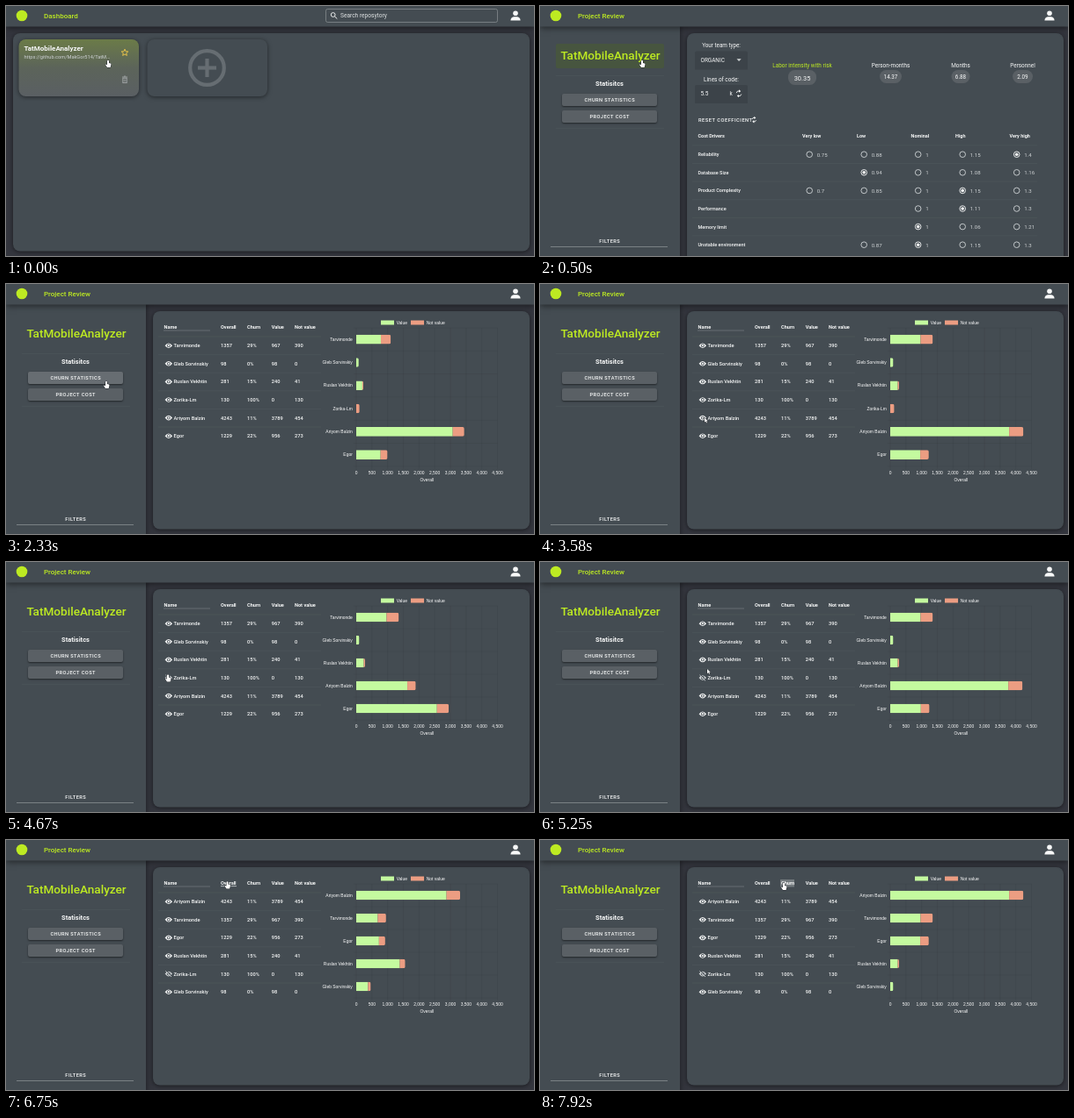
Animation of 600x285 px, one loop 8 s. Source, as an HTML page with a canvas:

```html
<!DOCTYPE html>
<html lang="en">
<head>
<meta charset="utf-8">
<title>Project review</title>
<style>
html, body { margin: 0; width: 100%; height: 100%; overflow: hidden; background: #34363e; }
canvas { display: block; }
</style>
</head>
<body>
<canvas id="stage" width="600" height="285"></canvas>
<script>
const ctx = document.getElementById('stage').getContext('2d');
const LOOP = 8000;
const GAP = '#34363e', PANEL = '#444c52', FIELD = '#3c4349', CHIP = '#5a6065', LINE = '#4e565b';
const WHITE = '#f7f8f8', SOFT = '#cfd3d5', LIME = '#bdea22', GREEN = '#c4fa9f', ORANGE = '#ec9d82';
const ROBOTO = 'Roboto, sans-serif', ARIAL = '"Liberation Sans", sans-serif';

const person = (name, overall, churn, value, rest) => ({ name, overall, churn, value, rest });
const people = [
  person('Tarvimonde', 1357, 29, 967, 390),
  person('Gleb Sorvinskiy', 98, 0, 98, 0),
  person('Ruslan Vekhtin', 281, 15, 240, 41),
  person('Zorika-Lm', 130, 100, 0, 130),
  person('Artyom Balzin', 4243, 11, 3789, 454),
  person('Egor', 1229, 22, 956, 273)
];
const hiddenPerson = people[3];
const sorted = [...people].sort((a, b) => b.overall - a.overall);
const isShown = p => p !== hiddenPerson;
const chartStates = [
  { start: 1990, rows: people },
  { start: 4540, rows: people.filter(isShown) },
  { start: 6505, rows: sorted.filter(isShown) }
];

const drivers = [
  ['Reliability', [0.75, 0.88, 1, 1.15, 1.4], 4],
  ['Database Size', [0, 0.94, 1, 1.08, 1.16], 1],
  ['Product Complexity', [0.7, 0.85, 1, 1.15, 1.3], 3],
  ['Performance', [0, 0, 1, 1.11, 1.3], 3],
  ['Memory limit', [0, 0, 1, 1.06, 1.21], 2],
  ['Unstable environment', [0, 0.87, 1, 1.15, 1.3], 2]
];
const levels = [['Very low', 298], ['Low', 360], ['Nominal', 421.5], ['High', 472], ['Very high', 533.5]];

// Pointer stops: time, x, y
const pointerPath = [
  [0, 116, 62], [920, 116, 62], [1250, 114, 111], [2670, 114, 111],
  [3420, 187, 152.5], [3580, 187, 152.5], [4170, 184, 128.5], [5000, 184, 128.5],
  [5240, 190, 122], [5420, 190.5, 121.5], [6080, 251.5, 47.5], [7200, 251.5, 47.5],
  [7560, 277, 49], [LOOP, 277, 49]
];

const lerp = (a, b, k) => a + (b - a) * k;
const easeOutQuart = k => 1 - (1 - k) ** 4;
const smooth = k => k * k * (3 - 2 * k);

function text(str, x, y, size = 5.6, { color = WHITE, align = 'left', weight = 500, font = ROBOTO, spacing = 0 } = {}) {
  ctx.font = `${weight} ${size}px ${font}`;
  ctx.letterSpacing = spacing + 'px';
  ctx.textAlign = align;
  ctx.fillStyle = color;
  ctx.fillText(str, x, y);
}

function box(x, y, w, h, radius, fill, shadow = 0) {
  ctx.save();
  if (shadow) {
    ctx.shadowColor = 'rgba(0,0,0,.5)';
    ctx.shadowBlur = shadow;
    ctx.shadowOffsetY = 1;
  }
  ctx.fillStyle = fill;
  ctx.beginPath();
  ctx.roundRect(x, y, w, h, radius);
  ctx.fill();
  ctx.restore();
}

function line(points, color, width = 1) {
  ctx.strokeStyle = color;
  ctx.lineWidth = width;
  ctx.beginPath();
  points.forEach(([x, y]) => ctx.lineTo(x, y));
  ctx.stroke();
}

function ring(x, y, r, color, width = 1, from = 0, to = Math.PI * 2) {
  ctx.strokeStyle = color;
  ctx.lineWidth = width;
  ctx.beginPath();
  ctx.arc(x, y, r, from, to);
  ctx.stroke();
}

function dot(x, y, r, color) {
  ctx.fillStyle = color;
  ctx.beginPath();
  ctx.arc(x, y, r, 0, Math.PI * 2);
  ctx.fill();
}

function polygon(points, fill) {
  ctx.fillStyle = fill;
  ctx.beginPath();
  points.forEach(([x, y]) => ctx.lineTo(x, y));
  ctx.closePath();
  ctx.fill();
}

function refreshIcon(x, y, r) {
  ring(x, y, r, WHITE, 0.9, -2.9, -0.9);
  ring(x, y, r, WHITE, 0.9, 0.25, 2.25);
  polygon([[x, y - r - 1.6], [x + 2, y - r + 0.1], [x, y - r + 1.8]], WHITE);
  polygon([[x, y + r - 1.8], [x - 2, y + r - 0.1], [x, y + r + 1.6]], WHITE);
}

function eyeIcon(x, y, off) {
  const color = off ? SOFT : WHITE;
  ctx.fillStyle = color;
  ctx.beginPath();
  ctx.moveTo(x - 4.2, y);
  ctx.quadraticCurveTo(x, y - 5.6, x + 4.2, y);
  ctx.quadraticCurveTo(x, y + 5.6, x - 4.2, y);
  ctx.fill();
  dot(x, y, 1.9, PANEL);
  dot(x, y, 1.1, color);
  if (off) {
    line([[x - 2.5, y - 3.6], [x + 3.8, y + 2.7]], PANEL, 1);
    line([[x - 3.4, y - 3.2], [x + 3.2, y + 3.4]], color, 0.9);
  }
}

function starIcon(x, y) {
  const points = [];
  for (let i = 0; i <= 10; i++) {
    const r = i % 2 ? 1.8 : 4, a = i * Math.PI / 5 - Math.PI / 2;
    points.push([x + r * Math.cos(a), y + r * Math.sin(a)]);
  }
  line(points, '#f3c94a', 0.9);
}

function trashIcon(x, y) {
  const color = '#a3a7a9';
  line([[x - 3, y - 3], [x + 3, y - 3]], color, 0.9);
  line([[x - 1, y - 3.9], [x + 1, y - 3.9]], color, 0.9);
  ctx.strokeRect(x - 2.2, y - 1.8, 4.4, 5.4);
  line([[x - 0.8, y - 0.5], [x - 0.8, y + 2.4]], color, 0.7);
  line([[x + 0.8, y - 0.5], [x + 0.8, y + 2.4]], color, 0.7);
}

function header(title) {
  box(0, -5, 600, 28.5, 0, PANEL, 7);
  dot(18, 11, 6.3, LIME);
  text(title, 43, 14, 8, { color: LIME });
  dot(579, 8.2, 2.8, WHITE);
  box(573.4, 12.2, 11.2, 4.2, [5, 5, 0, 0], WHITE);
}

function dashboard() {
  box(8, 31, 587, 248.5, 8, PANEL, 5);
  header('Dashboard');
  ctx.strokeStyle = '#858b8f';
  ctx.lineWidth = 0.8;
  ctx.beginPath();
  ctx.roundRect(363.5, 3.5, 195, 15, 2);
  ctx.stroke();
  ring(371.7, 10, 2.4, WHITE, 0.9);
  line([[373.4, 11.8], [376.3, 14.6]], WHITE, 1);
  text('Search reposytory', 380, 13.3, 6.6, { color: '#dfe2e3', weight: 400 });

  const hover = ctx.createLinearGradient(0, 38, 0, 103);
  hover.addColorStop(0, '#6b7b48');
  hover.addColorStop(0.5, '#5c645a');
  hover.addColorStop(1, '#5a5f63');
  box(14.5, 38, 136.5, 65, 8, hover, 5);
  text('TatMobileAnalyzer', 20.5, 51, 8, { weight: 700 });
  text('https://github.com/MakGor514/TatM...', 20.5, 60.3, 5.65, { color: SOFT, weight: 400 });
  starIcon(135, 53.2);
  trashIcon(135, 84);

  box(160.5, 38, 136.5, 65, 8, PANEL, 5);
  ring(228.5, 70.5, 19.3, '#666d72', 4.2);
  line([[218, 70.5], [239, 70.5]], '#666d72', 4.2);
  line([[228.5, 60], [228.5, 81]], '#666d72', 4.2);
}

function sidebar(t) {
  box(0, 20, 159, 270, 0, PANEL, 6);
  if (t < 1050) box(18, 43, 123, 28, 2, '#47553f');
  text('TatMobileAnalyzer', 80, 61, 13.6, { color: LIME, align: 'center' });
  text('Statisitcs', 79, 91.2, 7.5, { align: 'center', weight: 700 });
  for (const y of [79.5, 139.5]) line([[18, y], [141, y]], LINE, 0.6);
  const caps = { align: 'center', spacing: 0.4 };
  const overChurn = t > 1200 && t < 2760;
  box(25, 100, 108, 14, 2, overChurn ? '#676d72' : CHIP, 2);
  box(25, 119, 108, 14, 2, CHIP, 2);
  text('CHURN STATISTICS', 79.2, 109.3, 5.7, caps);
  text('PROJECT COST', 79.2, 128.3, 5.7, caps);
  text('FILTERS', 79.2, 270, 5.7, caps);
  line([[12, 274.5], [145, 274.5]], '#93989b', 0.7);
}

function metric(title, value, x, w, big) {
  text(title, x, 70.2, 6.4, { align: 'center', color: big ? LIME : WHITE, weight: 400 });
  box(x - w / 2, 73, w, big ? 17 : 15, 7.5, CHIP);
  text(value, x, big ? 84.5 : 82.6, big ? 7.4 : 6.3, { align: 'center', weight: 400 });
}

function costPage() {
  const body = { weight: 400 };
  text('Your team type:', 206, 47.2, 6.3, { align: 'center', weight: 400 });
  box(176, 51.5, 60, 21, [2, 2, 0, 0], FIELD);
  text('ORGANIC', 182.5, 64, 6.4, body);
  polygon([[223.5, 60.3], [228.7, 60.3], [226.1, 62.9]], SOFT);
  text('Lines of code:', 206, 86.2, 6.4, { align: 'center', weight: 400 });
  box(176, 90, 60, 21, [2, 2, 0, 0], FIELD);
  text('5.5', 182.5, 102.2, 6.4, body);
  text('k', 215.5, 102.2, 6.4, body);
  refreshIcon(226, 99.8, 2.9);

  metric('Labor intensity with risk', '30.35', 298, 32, true);
  metric('Person-months', '14.37', 398.5, 25);
  metric('Months', '6.88', 478, 21);
  metric('Personnel', '2.09', 548.5, 23);

  text('RESET COEFFICIENT', 180, 132, 5.7, { spacing: 0.5 });
  refreshIcon(243.3, 129.6, 2.3);
  text('Cost Drivers', 179.5, 150, 5.5, { weight: 700 });
  levels.forEach(([name, x]) => text(name, x, 150, 5.5, { weight: 700 }));

  drivers.forEach(([name, values, checked], row) => {
    const y = 169.2 + row * 20.6;
    line([[173, y - 10.3], [565, y - 10.3]], LINE, 0.7);
    text(name, 179.5, y + 2, 5.5);
    values.forEach((value, i) => {
      if (!value) return;
      const x = levels[i][1] + 8.2;
      ring(x, y, 3.3, i === checked ? WHITE : SOFT, 0.9);
      if (i === checked) dot(x, y, 1.8, WHITE);
      text(value, x + 8.5, y + 2.3, 6.1, { color: SOFT, weight: 400 });
    });
  });
}

function table(t) {
  if (t >= 7910) box(273, 45, 16, 8.5, 0, '#737a7e');
  const columns = [['Name', 179.5], ['Overall', 244], ['Churn', 274], ['Value', 301.7], ['Not value', 328]];
  columns.forEach(([name, x]) => text(name, x, 50.7, 5.6, { weight: 700 }));
  line([[179, 53], [232, 53]], '#7f8588', 0.6);
  if (t > 6050 && t < 7300) line([[244, 52.6], [262, 52.6]], WHITE, 0.6);

  (t < 6500 ? people : sorted).forEach((p, row) => {
    const y = 70.2 + row * 20.6;
    line([[173, y - 10.2], [358, y - 10.2]], LINE, 0.7);
    eyeIcon(184.8, y, p === hiddenPerson && t > 4540);
    const cells = [p.name, p.overall, p.churn + '%', p.value, p.rest];
    cells.forEach((cell, i) => text(cell, i ? columns[i][1] : 190.5, y + 2, 5.7));
  });
}

function chart(t) {
  const current = chartStates.findLastIndex(s => t >= s.start);
  if (current < 0) return;
  const { start, rows } = chartStates[current];
  const before = current ? chartStates[current - 1].rows : [];
  const k = easeOutQuart(Math.min(1, (t - start) / 1000));
  const left = 398, top = 50, width = 160.5, unit = width / 4500;
  const step = rows.length === 6 ? 26.3 : 26;
  const bottom = top + step * rows.length;
  const label = (str, x, y, align) => text(str, x, y, 4.95, { align, font: ARIAL, weight: 400, color: '#fff' });

  box(426, 41.5, 15, 5, 0, GREEN);
  label('Value', 443.7, 45.8);
  box(460, 41.5, 15, 5, 0, ORANGE);
  label('Not value', 477.8, 45.8);

  const grid = 'rgba(0,0,0,.1)';
  for (let i = 0; i <= 9; i++) {
    const x = left + i * width / 9;
    line([[x, top], [x, bottom + 3]], grid, 0.6);
    label((i * 500).toLocaleString('en-US'), x, bottom + 8.8, 'center');
  }
  for (let i = 0; i <= rows.length; i++) {
    line([[left - 3, top + i * step], [left + width, top + i * step]], grid, 0.6);
  }
  label('Overall', left + width / 2, bottom + 17.3, 'center');

  rows.forEach((p, i) => {
    const y = top + step * (i + 0.5);
    const old = before[i] || { value: 0, rest: 0 };
    const good = lerp(old.value, p.value, k) * unit;
    const bad = lerp(old.rest, p.rest, k) * unit;
    label(p.name, 393.8, y + 1.6, 'right');
    ctx.save();
    ctx.beginPath();
    ctx.roundRect(left, y - 5.3, good + bad, 10.6, [0, 2, 2, 0]);
    ctx.clip();
    box(left, y - 5.3, good, 10.6, 0, GREEN);
    box(left + good, y - 5.3, bad, 10.6, 0, ORANGE);
    ctx.restore();
  });
}

const HAND = 'M-1 .5Q0-.8 1 .5V3L3 3.6Q3.6 4 3.4 5L2.6 8H-1L-3 5Q-2.8 3.8-1 5Z';
const ARROW = 'M0 0V5.2L1.3 4.1L2.2 6L3 5.6L2.2 3.8H3.8Z';

function pointer(t) {
  const i = pointerPath.findLastIndex(p => t >= p[0]);
  const [t0, x0, y0] = pointerPath[i];
  const [t1, x1, y1] = pointerPath[i + 1];
  const k = smooth((t - t0) / (t1 - t0));
  const moving = x0 !== x1 || y0 !== y1;
  const shape = new Path2D(moving ? ARROW : HAND);
  ctx.save();
  ctx.translate(lerp(x0, x1, k), lerp(y0, y1, k));
  ctx.strokeStyle = '#22262a';
  ctx.lineWidth = 1;
  ctx.stroke(shape);
  ctx.fillStyle = '#fff';
  ctx.fill(shape);
  ctx.restore();
}

function draw(now) {
  const t = now % LOOP;
  box(0, 0, 600, 285, 0, GAP);
  if (t < 165) {
    dashboard();
  } else {
    const onCost = t < 1910;
    box(167, 31, 428, onCost ? 270 : 248.5, 8, PANEL, 5);
    sidebar(t);
    header('Project Review');
    if (!onCost) {
      table(t);
      chart(t);
    } else if (t > 325) {
      costPage();
    }
  }
  pointer(t);
  requestAnimationFrame(draw);
}
requestAnimationFrame(draw);
</script>
</body>
</html>
```
